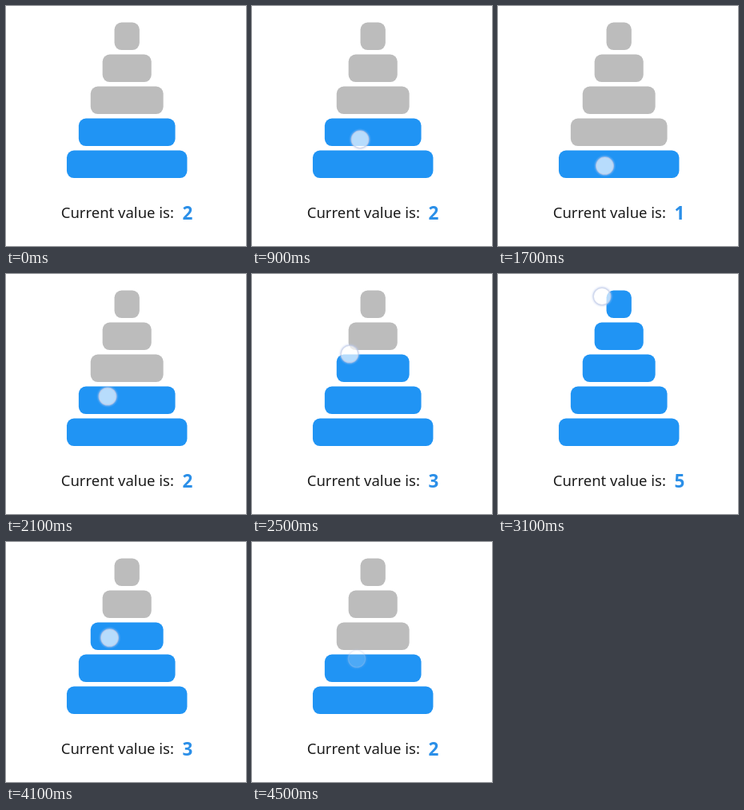
Animation of 300 by 300 pixels, one loop 4600 ms. Source, as an HTML page with a canvas:

```html
<!DOCTYPE html>
<html lang="en">
<head>
<meta charset="utf-8">
<title>Pyramid slider</title>
<style>
html, body { margin: 0; width: 100%; height: 100%; overflow: hidden; background: #fff; }
canvas { display: block; width: 300px; height: 300px; }
</style>
</head>
<body>
<canvas id="stage"></canvas>
<script>
const LOOP = 4600, STEP = 100;
const BLUE = '#2094f4', GREY = '#bcbcbc';
const BARS = 5, PITCH = 40, BASE = 180.6;
const canvas = document.getElementById('stage');
const ctx = canvas.getContext('2d');
const dpr = window.devicePixelRatio || 1;
canvas.width = canvas.height = 300 * dpr;
ctx.scale(dpr, dpr);

const clamp = (v, lo, hi) => Math.max(lo, Math.min(hi, v));

// Drag down, up to the top and back: time, x, y
const path = [
  [700, 134, 155], [1300, 139, 218], [1420, 138, 227],
  [2100, 127, 153], [2500, 122, 100], [3100, 130, 28],
  [3300, 131, 17], [3700, 128, 72], [4500, 131, 146]
];

// Slope of coordinate c at key i; the drag starts and ends at rest
function slope(i, c) {
  const a = path[i - 1], b = path[i + 1];
  return a && b ? (b[c] - a[c]) / (b[0] - a[0]) : 0;
}

// Smooth cubic through the keys
function along(t, c) {
  const i = path.findIndex((p, n) => n > 0 && t <= p[0]);
  const a = path[i - 1], b = path[i];
  const h = b[0] - a[0], s = (t - a[0]) / h, r = 1 - s;
  return a[c] * (1 + 2 * s) * r * r + b[c] * s * s * (3 - 2 * s)
    + h * s * r * (r * slope(i - 1, c) - s * slope(i, c));
}

function fingerAt(t) {
  if (t < path[0][0]) return null;
  return {
    x: along(t, 1),
    y: along(t, 2),
    alpha: clamp(Math.min(t - 600, 4560 - t) / 200, 0, 1)
  };
}

function valueAt(finger) {
  return finger ? clamp(Math.ceil((219 - finger.y) / PITCH), 0, BARS) : 2;
}

function drawBars(value) {
  for (let i = 0; i < BARS; i++) {
    const w = 150.5 - i * 29.8;
    ctx.fillStyle = i < value ? BLUE : GREY;
    ctx.beginPath();
    ctx.roundRect(151.2 - w / 2, BASE - i * PITCH, w, 34.5, 9);
    ctx.fill();
  }
}

function drawText(value) {
  ctx.fillStyle = '#1c1c1c';
  ctx.font = '18.5px "Noto Sans", "Open Sans", sans-serif';
  ctx.fillText('Current value is:', 68.7, 265);
  ctx.fillStyle = '#2b8fe8';
  ctx.font = 'bold 22.5px "Noto Sans", "Open Sans", sans-serif';
  ctx.fillText(value, 220.4, 266.6);
}

function disc(x, y, r, fill) {
  ctx.beginPath();
  ctx.arc(x, y, r, 0, Math.PI * 2);
  ctx.fillStyle = fill;
  ctx.fill();
}

function drawFinger({ x, y, alpha }) {
  const glow = ctx.createRadialGradient(x, y, 9.5, x, y, 14);
  glow.addColorStop(0, 'rgba(190,205,240,0)');
  glow.addColorStop(0.35, 'rgba(190,205,240,0.4)');
  glow.addColorStop(1, 'rgba(190,205,240,0)');
  ctx.globalAlpha = alpha;
  disc(x, y, 14, glow);
  disc(x, y, 10.8, 'rgba(255,255,255,0.68)');
  ctx.lineWidth = 1.5;
  ctx.strokeStyle = 'rgba(190,200,228,0.6)';
  ctx.stroke();
  ctx.globalAlpha = 1;
}

function draw(now) {
  const t = Math.floor((now % LOOP) / STEP) * STEP;
  const finger = fingerAt(t);
  const value = valueAt(finger);
  ctx.fillStyle = '#fff';
  ctx.fillRect(0, 0, 300, 300);
  drawBars(value);
  drawText(value);
  if (finger) drawFinger(finger);
}

let start;
function tick(now) {
  start ??= now;
  draw(Math.max(0, now - start));
  requestAnimationFrame(tick);
}
draw(0);
requestAnimationFrame(tick);
</script>
</body>
</html>
```
